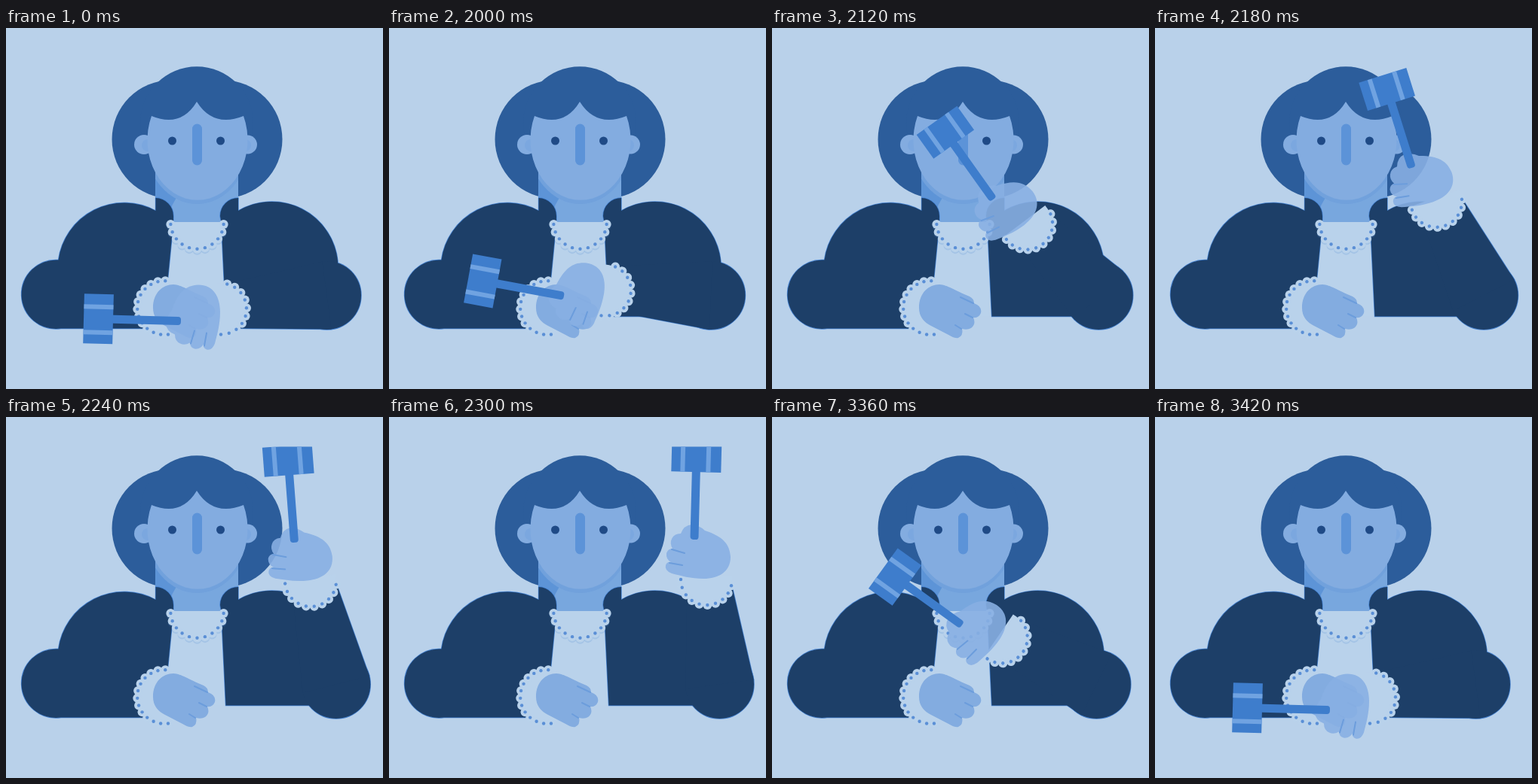
These frames come from a looping animation (500 px wide and 480 px high, 4.92 s). An HTML page:

```html
<!DOCTYPE html>
<html lang="en">
<head>
<meta charset="utf-8">
<title>Judge with gavel</title>
<style>
  html, body { margin: 0; height: 100%; overflow: hidden; background: #b9d1ea; }
  svg { display: block; width: 500px; height: 480px; }
  .hair { fill: #2c5d9b; }
  .skin { fill: #83ace0; }
  .hand { fill: #83ace0; }
  .crease { fill: none; stroke: #6c9ddc; stroke-width: 2; stroke-linecap: round; }
  .cloth { fill: #b9d2eb; }
  .dot { fill: #5a8fd6; }
  .shade { fill: #5a90d4; opacity: .22; }
  .wood { fill: #3e7dcc; }
  .band { fill: #70a3e1; }
</style>
</head>
<body>
<svg viewBox="0 0 500 480">
  <defs>
    <clipPath id="neckClip"><path d="M198 190H308V258H198Z"/></clipPath>
    <clipPath id="topClip"><path d="M0 39.5H500V480H0Z"/></clipPath>
    <g id="coat">
      <path d="M222 258V250A24 24 0 0 0 198.5 226V243A88 88 0 0 0 69.5 308.5A45.8 45.8 0 1 0 73 399.5H205L214 340Z"/>
      <path d="M285.5 258L284 250A24 24 0 0 1 308 226V243A88 88 0 0 1 440 310V383.5H291.5Z"/>
      <circle id="elbow" r="45.5"/>
      <path id="forearm"/>
    </g>
  </defs>

  <g class="hair">
    <circle cx="219.3" cy="148" r="78.8"/>
    <circle cx="287.7" cy="148" r="78.8"/>
    <circle cx="253" cy="126.3" r="75"/>
  </g>

  <g clip-path="url(#neckClip)">
    <path d="M198 190H308V258H198Z" fill="#78a7de"/>
    <path d="M198 190L228 222L218 240L198 228Z" fill="#5d94d7"/>
    <ellipse cx="253.5" cy="154" rx="68" ry="80" fill="#71a1dc"/>
  </g>

  <g class="skin">
    <circle cx="183" cy="155" r="13"/>
    <circle cx="320.5" cy="155" r="12.5"/>
    <circle cx="188" cy="156" r="8" fill="#7ba7df"/>
    <circle cx="317" cy="156" r="8" fill="#7ba7df"/>
    <path d="M193 117Q232 133 253 98Q275 133 315 117A66.5 80 0 1 1 193 117Z"/>
  </g>
  <g fill="#1f4a86">
    <circle cx="220.5" cy="150" r="5.5"/>
    <circle cx="284.5" cy="150" r="5.5"/>
  </g>
  <path d="M253.5 134V176" stroke="#5c93d8" stroke-width="13" stroke-linecap="round"/>

  <path class="cloth" d="M222 258H284L291.5 383.5H214Z"/>
  <use href="#coat" fill="none" stroke="#4583d3" stroke-width="1.4"/>
  <use href="#coat" fill="#1d3f68"/>

  <g id="collar"><path class="cloth" d="M218 258H289A35.5 35.5 0 0 1 218 258Z"/></g>

  <g id="leftCuff"><circle class="cloth" cx="210" cy="372" r="36"/></g>
  <path class="hand" d="M195 372C195 352 208 341 222 341C234 342 240 348 262 357Q268 360 268 366Q279 370 277 379Q274 386 267 385Q271 394 264 399Q259 402 252 400Q254 409 247 412Q243 413 236 409L211 396Q195 388 195 372Z"/>
  <path class="crease" d="M250 358L267 366M256 380L266 385M243 395L251 400"/>

  <g clip-path="url(#topClip)">
    <g id="grip">
      <g id="rightCuff"><path class="cloth" d="M50 -50H55A34 34 0 0 1 55 18H50Z"/></g>
      <path class="hand" style="fill:#88b0e3" opacity=".89" d="M-6 18Q-17 14 -18 4Q-17 -7 -10 -14C-2 -38 8 -47 25 -48C45 -48 54 -32 54 -12C54 5 50 18 47 30Q43 40 36 38Q31 36 32 31Q28 38 20 37Q14 35 14 29Q7 33 1 30Q-6 27 -6 18Z"/>
      <path class="crease" d="M15 30L20 13M33 33L36 16"/>
      <g class="wood" transform="rotate(1.5)">
        <rect x="-100" y="-5.5" width="102" height="11" rx="4"/>
        <rect x="-127" y="-33" width="39" height="66"/>
        <path class="band" d="M-127 -19h39v6h-39ZM-127 15h39v6h-39Z"/>
      </g>
    </g>
  </g>
</svg>

<script>
const $ = id => document.getElementById(id);

// Scalloped edge with a bead in each scallop, along an arc given in degrees.
function lace(id, cx, cy, r, from, to, count, shadow) {
  const ring = (cls, size, dy) => Array.from({ length: count }, (_, i) => {
    const a = (from + (to - from) * i / (count - 1)) * Math.PI / 180;
    return `<circle class="${cls}" cx="${cx + r * Math.cos(a)}" cy="${cy + r * Math.sin(a) + dy}" r="${size}"/>`;
  }).join('');
  const under = shadow ? ring('shade', 6, 2) : '';
  $(id).insertAdjacentHTML('afterbegin', under);
  $(id).insertAdjacentHTML('beforeend', ring('cloth', 6, 0) + ring('dot', 2.2, 0));
}
lace('collar', 253.5, 258.5, 35.2, 4, 176, 11, true);
lace('leftCuff', 210, 372, 35.8, 82, 272, 13);
lace('rightCuff', 55, -16, 34, -76, 90, 10);

// Key poses of the raising arm: step, grip x, grip y, turn, elbow x.
const poses = [
  [0, 230, 389.5, 0, 425.5],
  [1, 230, 356, 9, 427],
  [3, 246, 282, 32, 430],
  [7, 340, 184, 71, 436],
  [11, 405, 161, 90, 438.5]
];

function slope(i, c) {
  const a = poses[i - 1], b = poses[i + 1];
  return a && b ? (b[c] - a[c]) / (b[0] - a[0]) : 0;
}

// Smooth Hermite curve through the key poses.
function poseAt(step) {
  let i = 0;
  while (i < poses.length - 2 && step > poses[i + 1][0]) i++;
  const a = poses[i], b = poses[i + 1], h = b[0] - a[0], u = (step - a[0]) / h;
  return [1, 2, 3, 4].map(c =>
    a[c] + (b[c] - a[c]) * u * u * (3 - 2 * u) +
    h * u * (1 - u) * (slope(i, c) * (1 - u) - slope(i + 1, c) * u));
}

function stepAt(t) {
  if (t < 2000) return 0;
  if (t < 3300) return Math.min(11, Math.floor((t - 2000) / 30) + 1);
  return 6.45 * Math.max(0, 1 - Math.floor((t - 3300) / 30) / 4);
}

function draw(t) {
  const [x, y, turn, ex] = poseAt(stepAt(t)), ey = 355.5;
  $('grip').setAttribute('transform', `translate(${x} ${y}) rotate(${turn})`);
  $('elbow').setAttribute('cx', ex);
  $('elbow').setAttribute('cy', ey);

  // The sleeve tapers from the elbow to just inside the cuff.
  const a = turn * Math.PI / 180, cos = Math.cos(a), sin = Math.sin(a);
  const wx = x + 63 * cos + 16 * sin, wy = y + 63 * sin - 16 * cos;
  const len = Math.hypot(wx - ex, wy - ey);
  const nx = (ey - wy) / len, ny = (wx - ex) / len;
  const side = (px, py, d) => `${px + nx * d} ${py + ny * d}`;
  $('forearm').setAttribute('d',
    `M${side(ex, ey, 45.5)}L${side(wx, wy, 33)}L${side(wx, wy, -26)}L${side(ex, ey, -45.5)}Z`);
}

const start = performance.now();
function tick() {
  draw((performance.now() - start) % 4920);
  requestAnimationFrame(tick);
}
tick();
</script>
</body>
</html>
```
